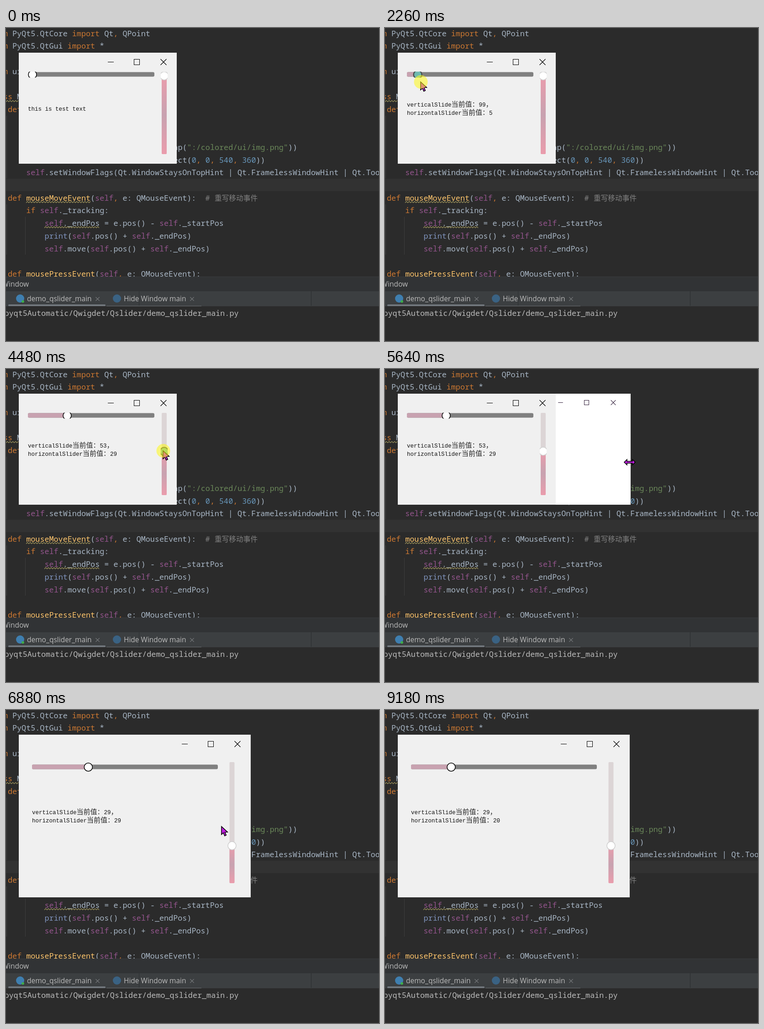
Animation, 817 px wide and 685 px high, one loop 9710 ms. Source, as an HTML page with a canvas:

```html
<!DOCTYPE html>
<html lang="zh">
<head>
<meta charset="utf-8">
<title>Slider demo</title>
<style>
html, body { margin: 0; width: 100%; height: 100%; overflow: hidden; background: #2b2b2b; }
canvas { display: block; width: 817px; height: 685px; }
</style>
</head>
<body>
<canvas id="stage" width="817" height="685"></canvas>
<script>
const ctx = document.getElementById('stage').getContext('2d');
const LOOP = 9710, STEP = 70, LAG = 12;

const MONO = '16.78px "Noto Sans Mono", "DejaVu Sans Mono", monospace';
const UI = '15.5px "Open Sans", "Noto Sans", sans-serif';
const LATIN = '12.5px "Liberation Mono", monospace';
const CJK = '"Noto Sans CJK SC", "Noto Sans CJK", sans-serif';
const INK = '#111', BAR = '#bbbbbb';

const C = {
  t: '#a9b7c6', k: '#cc7832', s: '#94558d', f: '#ffc66d',
  q: '#6a8759', n: '#6897bb', b: '#7f93bd', c: '#808080'
};

// ---- pointer story: turning points as time, x, y ----
const PATH = [
  [140, 433, 576], [1050, 131, 153], [1190, 131, 153], [1330, 167, 168],
  [1610, 64, 112], [1820, 64, 112], [2240, 78, 118], [2800, 140, 111],
  [3640, 358, 125], [3780, 349, 104], [4270, 346, 188], [4480, 344, 179],
  [4660, 344, 179], [4820, 372, 171], [5350, 372, 171], [5600, 536, 204],
  [6300, 497, 237], [6580, 504, 314], [6720, 500, 296], [6860, 472, 255],
  [7280, 186, 130], [7420, 186, 130], [7630, 458, 135], [7770, 207, 139],
  [7910, 114, 136], [8050, 151, 140], [8330, 304, 255], [9100, 552, 653]
];
const ENTER = 200, LEAVE = 9170, MOVED = 1890, EDGE = 4820, PULL = 5350, SNAP = 5850;

const SMALL = {
  w: 346, h: 243, shift: 0, clip: true,
  track: [48, 96.5, 277], h0: 58, hUnit: 2.61,
  bar: [341, 96, 180], v0: 267, vUnit: 1.64, label: [48, 172]
};
const LARGE = {
  w: 508, h: 356, shift: 162, clip: false,
  track: [57, 119.5, 407], h0: 67, hUnit: 3.89,
  bar: [489.5, 114, 265], v0: 369, vUnit: 2.48, label: [57, 228]
};

const DRAGS = [
  { from: 1610, to: 2800, axis: 'h', view: SMALL },
  { from: 3780, to: 4660, axis: 'v', view: SMALL },
  { from: 6300, to: 6720, axis: 'v', view: LARGE },
  { from: 7280, to: 8050, axis: 'h', view: LARGE }
];

const clamp = (v, lo, hi) => Math.max(lo, Math.min(hi, v));

function pointer(t) {
  const n = clamp(PATH.findIndex(p => p[0] > t), 1, PATH.length - 1);
  const [a, b] = t >= PATH[PATH.length - 1][0] ? PATH.slice(-2) : [PATH[n - 1], PATH[n]];
  const u = clamp((t - a[0]) / (b[0] - a[0]), 0, 1);
  return [a[1] + (b[1] - a[1]) * u, a[2] + (b[2] - a[2]) * u];
}

// A slider follows the pointer a little late and keeps its value on release.
function sliderValue(axis, t, initial) {
  const d = DRAGS.filter(e => e.axis === axis && e.from <= t).pop();
  if (!d) return initial;
  const [x, y] = pointer(clamp(t - LAG, d.from, d.to));
  const g = d.view;
  const v = axis === 'h' ? (x - 6 - g.h0) / g.hUnit : (g.v0 - y - 1) / g.vUnit;
  return clamp(v, 0, 99);
}

// ---- drawing helpers ----
function rect(x, y, w, h, color) {
  ctx.fillStyle = color;
  ctx.fillRect(x, y, w, h);
}
function pill(x, y, w, h, r, color) {
  ctx.fillStyle = color;
  ctx.beginPath();
  ctx.roundRect(x, y, w, h, r);
  ctx.fill();
}
function disc(x, y, r, color) {
  ctx.fillStyle = color;
  ctx.beginPath();
  ctx.arc(x, y, r, 0, 7);
  ctx.fill();
}
function text(str, x, y, color, font, align = 'left') {
  ctx.font = font;
  ctx.fillStyle = color;
  ctx.textAlign = align;
  ctx.fillText(str, x, y);
  return x + ctx.measureText(str).width;
}
function cross(x, y, r, color) {
  ctx.strokeStyle = color;
  ctx.lineWidth = 1.1;
  ctx.beginPath();
  ctx.moveTo(x - r, y - r); ctx.lineTo(x + r, y + r);
  ctx.moveTo(x + r, y - r); ctx.lineTo(x - r, y + r);
  ctx.stroke();
}
function poly(points, x, y) {
  ctx.beginPath();
  points.forEach(([dx, dy]) => ctx.lineTo(x + dx, y + dy));
  ctx.closePath();
  ctx.lineWidth = 1.5;
  ctx.fillStyle = '#c01fe0';
  ctx.strokeStyle = '#000';
  ctx.fill();
  ctx.stroke();
}
function wave(x0, x1, y) {
  ctx.strokeStyle = '#a0965c';
  ctx.lineWidth = 1.1;
  ctx.beginPath();
  for (let x = x0, d = 1.5; x <= x1; x += 3, d = -d) ctx.lineTo(x, y + d);
  ctx.stroke();
}

// ---- editor: row, column, coloured parts ----
const CODE = [
  [0, 0, 'k:from ', 't:PyQt5.QtCore ', 'k:import ', 't:Qt', 'k:, ', 't:QPoint'],
  [1, 0, 'k:from ', 't:PyQt5.QtGui ', 'k:import ', 't:*'],
  [3, 0, 'k:from ', 't:ui'],
  [5, 0, 'k:class ', 't:M'],
  [6, 4, 'k:def '],
  [9, 40, 't:ap(', 'q:":/colored/ui/img.png"', 't:))'],
  [10, 40, 't:ect(', 'n:0', 'k:, ', 'n:0', 'k:, ', 'n:540', 'k:, ', 'n:360', 't:))'],
  [11, 8, 's:self', 't:.setWindowFlags(Qt.WindowStaysOnTopHint | Qt.FramelessWindowHint | Qt.Tool)'],
  [13, 4, 'k:def ', 'f:mouseMoveEvent', 't:(', 's:self', 'k:, ', 't:e: QMouseEvent):  ', 'c:# '],
  [14, 8, 'k:if ', 's:self', 't:._tracking:'],
  [15, 12, 's:self', 't:._endPos = e.pos() - ', 's:self', 't:._startPos'],
  [16, 12, 'b:print', 't:(', 's:self', 't:.pos() + ', 's:self', 't:._endPos)'],
  [17, 12, 's:self', 't:.move(', 's:self', 't:.pos() + ', 's:self', 't:._endPos)'],
  [19, 4, 'k:def ', 'f:mousePressEvent', 't:(', 's:self', 'k:, ', 't:e: QMouseEvent):']
];

function drawEditor() {
  rect(0, 0, 817, 685, '#2b2b2b');
  rect(0, 330, 817, 27, '#323232');
  rect(1, 192, 1, 137, '#3d3d3d');
  rect(1, 386, 1, 110, '#3d3d3d');
  rect(42, 413, 1, 83, '#3d3d3d');
  for (const [row, col, ...parts] of CODE) {
    let x = -36.3 + 10.068 * col;
    for (const p of parts) x = text(p.slice(2), x, 17.6 + 27.7 * row, C[p[0]], MONO);
  }
  text('重写移动事件', 457, 378, C.c, '15.7px ' + CJK);
  wave(0, 28, 160);
  wave(44, 185, 381);
  wave(84, 205, 436);
}

function drawTab(x, label, color) {
  disc(x, 592, 9, color);
  const end = text(label, x + 15, 598, BAR, UI);
  cross(end + 13, 593, 4.2, '#7b7e80');
}

function drawPanel() {
  rect(0, 544, 817, 32, '#313335');
  rect(0, 544, 817, 1, '#3a3c3e');
  rect(0, 576, 817, 33, '#3c3f41');
  rect(0, 575, 817, 1, '#2f3133');
  rect(0, 609, 817, 76, '#2b2b2b');
  rect(291, 576, 1, 32, '#2e3032');
  rect(668, 576, 1, 32, '#2a2c2e');
  pill(5, 605, 213, 3.5, 1.5, '#747a80');
  rect(220, 608, 208, 1, '#6a6e72');
  text('Window', 50, 565.5, BAR, UI, 'right');
  drawTab(31, 'demo_qslider_main', '#3f7fb0');
  disc(37, 598.5, 2.8, '#3fae49');
  drawTab(243, 'Hide Window main', '#3a6283');
  text('pyqt5Automatic/Qwigdet/Qslider/demo_qslider_main.py', 509.5, 629.5, BAR, MONO, 'right');
}

// ---- dialog ----
function knob(x, y, pressed, edge, clip) {
  ctx.save();
  if (clip) {
    ctx.beginPath();
    ctx.rect(...clip);
    ctx.clip();
  }
  disc(x, y, 9, pressed ? '#6fb9b0' : '#fff');
  ctx.strokeStyle = pressed ? '#4a4f50' : edge;
  ctx.lineWidth = pressed ? 2.5 : 1.5;
  ctx.stroke();
  ctx.restore();
}

function buttons(dx, y, r, color) {
  rect(229.5 + dx - r, y - .5, 2 * r, 1, color);
  ctx.strokeStyle = color;
  ctx.lineWidth = 1;
  ctx.strokeRect(286.5 + dx - Math.floor(r), y - Math.floor(r), 2 * Math.floor(r), 2 * Math.floor(r));
  cross(345 + dx, y, r, color);
}

function labelLine(name, value, end, x, y) {
  const wide = (str, wx) => text(str, wx, y, '#2a2a2a', '300 15px ' + CJK);
  x = wide('当前值：', text(name, x, y, INK, LATIN));
  wide(end, text(Math.round(value), x, y, INK, LATIN));
}

function drawDialog(t, g, axis) {
  const h = sliderValue('h', t, 0), v = sliderValue('v', t, 99);
  rect(28, 54, g.w, g.h, '#f0f0f0');
  buttons(g.shift, 74.5, 6.5, '#000');

  const [tx, ty, tw] = g.track, hx = g.h0 + g.hUnit * h;
  pill(tx, ty, tw, 10, 3, '#808080');
  pill(tx, ty, hx - tx, 10, 2, h > 0 ? '#c8a2b0' : '#f0f0f0');
  knob(hx, ty + 5.5, axis === 'h', '#000', g.clip && [tx, 95.5, tw, 13]);

  const [bx, by, bh] = g.bar, vy = g.v0 - g.vUnit * v;
  pill(bx, by, 11, bh, 2, '#dcd5d6');
  const grad = ctx.createLinearGradient(0, vy, 0, by + bh);
  grad.addColorStop(0, '#ea9cac');
  grad.addColorStop(.5, '#c8a2b0');
  grad.addColorStop(1, '#ea9cac');
  pill(bx, vy, 11, by + bh - vy, 2, grad);
  knob(bx + 5.5, vy, axis === 'v', '#cfcfcf', g.clip && [339, by, 15, bh]);

  const [lx, ly] = g.label;
  if (t < MOVED) {
    text('this is test text', lx, 181, INK, LATIN);
  } else {
    labelLine('verticalSlide', v, '，', lx, ly);
    labelLine('horizontalSlider', h, '', lx, ly + 18);
  }
}

// Unpainted strip shown while the right edge is pulled.
function drawStrip(right) {
  if (right <= 374) return;
  ctx.save();
  ctx.beginPath();
  ctx.rect(374, 54, right - 374, 243);
  ctx.clip();
  rect(374, 54, right - 374, 243, '#fff');
  buttons(right - 383, 73.5, 5.3, '#33203c');
  ctx.restore();
}

// ---- pointer shapes ----
const ARROW = [[0, 0], [0, 17.5], [4, 13.8], [7, 20.5], [10.3, 19], [7.4, 12.6], [13.3, 12.2]];
const HEAD = [[-6, 2], [-6, 6], [-12, 0], [-6, -6], [-6, -2]];
const RESIZE = [...HEAD, ...HEAD.map(([x, y]) => [-x, -y])];

function drawPointer(t, x, y, pressed) {
  if (t < ENTER || t >= LEAVE) return;
  poly(t >= EDGE && t < SNAP ? RESIZE : ARROW, x, y);
  if (pressed) disc(x + .5, y, 15, 'rgba(255,250,15,.53)');
}

function draw(now) {
  const t = STEP * Math.floor(now % LOOP / STEP);
  const [x, y] = pointer(t);
  const drag = DRAGS.find(d => t >= d.from && t <= d.to);
  drawEditor();
  drawPanel();
  drawDialog(t, t < SNAP ? SMALL : LARGE, drag && drag.axis);
  if (t >= PULL && t < SNAP) drawStrip(Math.round(x + 2));
  drawPointer(t, x, y, drag);
}

let start;
function tick(now) {
  if (start === undefined) start = now;
  draw(now - start);
  requestAnimationFrame(tick);
}
draw(0);
requestAnimationFrame(tick);
</script>
</body>
</html>
```
